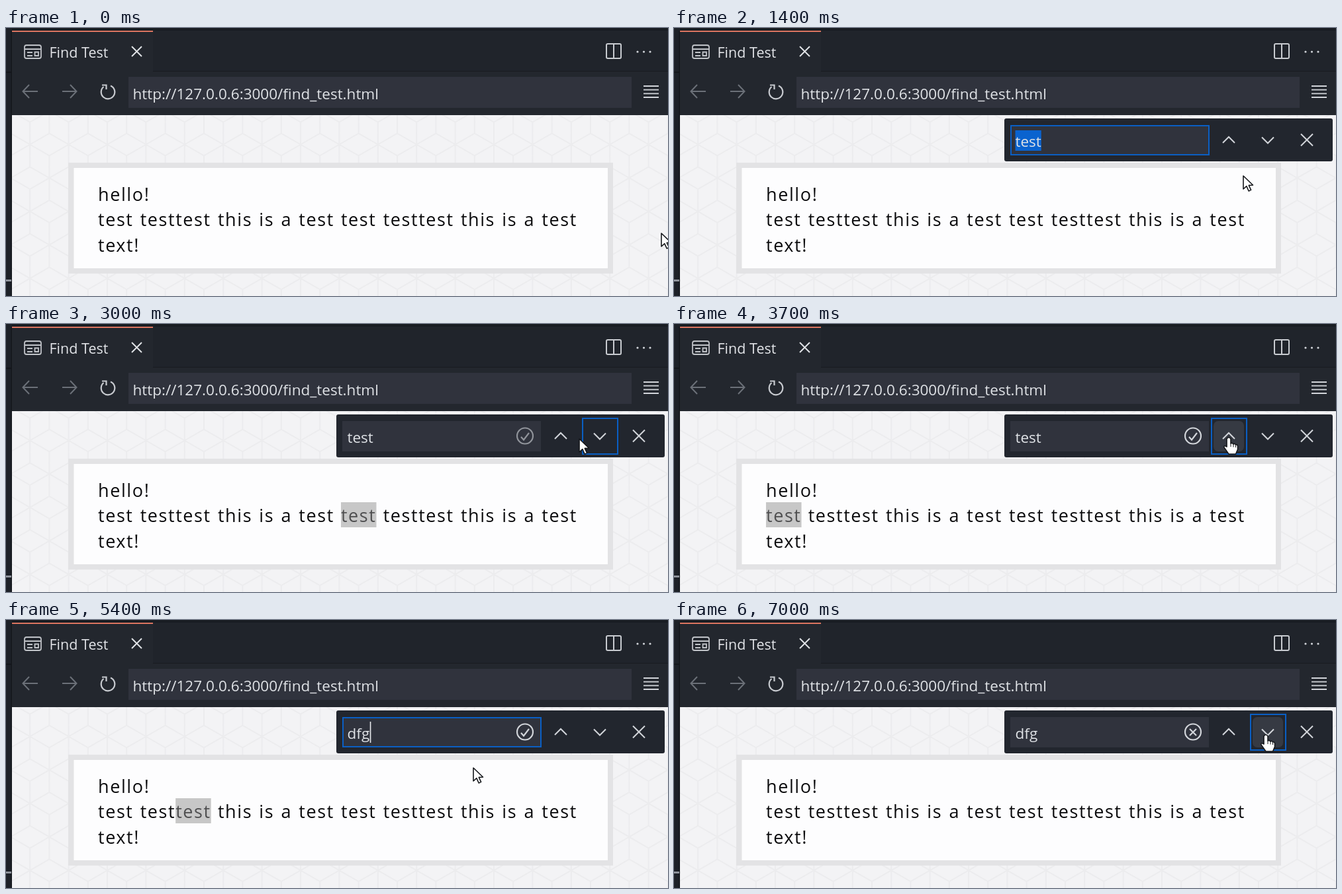
An HTML page with a canvas for the animation above (7.2 s loop, 1000 by 406 pixels).

```html
<!DOCTYPE html>
<html lang="en">
<head>
<meta charset="utf-8">
<title>Find in page</title>
<style>
  html, body { margin: 0; width: 100%; height: 100%; overflow: hidden; background: #20242b; }
  canvas { display: block; }
</style>
</head>
<body>
<canvas id="stage" width="1000" height="406"></canvas>
<script>
const ctx = document.getElementById('stage').getContext('2d');
const LOOP = 7200, STEP = 100;
const UI = '"Open Sans", "Noto Sans", sans-serif';
const ARIAL = '"Liberation Sans", Arial, sans-serif';
const LIGHT = '#d2d5da', FIELD = '#30333d', BLUE = '#0a5fc4';
const LINE = 'test testtest this is a test test testtest this is a test';
const MATCHES = [...LINE.matchAll(/test/g)].map(m => m.index);

// Timelines: [time, value], each value lasts until the next entry.
const FOCUS = [[0, ''], [500, 'menu'], [1400, 'input'], [2000, 'next'], [3200, 'prev'],
  [4200, 'next'], [4800, 'input'], [6000, ''], [6300, 'next']];
const MATCH = [[0, -1], [2000, 0], [2200, 1], [2400, 2], [2500, 3], [2700, 4],
  [3200, 3], [3300, 2], [3500, 1], [3700, 0], [4200, 1], [4400, 2], [6400, -1]];
const QUERY = [[0, 'test'], [5200, 'd'], [5300, 'df'], [5400, 'dfg']];
const RESULT = [[0, 0], [2100, 1], [2900, .6], [3100, 0], [3300, 1], [4000, .6],
  [4200, 0], [4500, 1]];
// Pointer path: [time, x, y], linear in between.
const POINTER = [[0, 990, 311], [100, 990, 298], [400, 968, 87], [800, 968, 87],
  [1100, 860, 224], [1400, 860, 224], [1800, 896, 170], [2700, 896, 170],
  [3000, 866, 174], [3200, 838, 172], [3900, 838, 172], [4200, 892, 180],
  [4500, 892, 180], [4800, 720, 172], [5200, 706, 224], [5500, 706, 224],
  [5900, 894, 174], [7200, 894, 174]];

const BUTTONS = {
  menu: [953, 75, 43, 46], prev: [815, 147, 46, 46],
  next: [874, 147, 46, 46], close: [933, 147, 46, 46]
};
const INPUT = [508, 147, 300, 46];
const MENU = ['Open in Browser', 'Find in Page', 'Open Devtools Pane'];
const ARROW = new Path2D('M0 0V20L4.8 15.6 8.2 23 11.6 21.4 8.3 14.4 14.5 14Z');
const HAND = new Path2D('M-3 2Q0-2.5 3 2V9Q5 7.500 7 10 9 8.500 10.500 11 13 10 13.500 13V18L10.500 25H0L-7 15Q-8 11-3 14Z');
const IBEAM = new Path2D('M-4-11H4M0-11V11M-4 11H4');

const at = (list, t) => list.findLast(e => e[0] <= t)[1];
const inside = ([x, y, w, h], p) => p.x >= x && p.x <= x + w && p.y >= y && p.y <= y + h;

function pointerAt(t) {
  const i = POINTER.findIndex(k => k[0] > t);
  const [t0, x0, y0] = POINTER[i - 1], [t1, x1, y1] = POINTER[i];
  const k = (t - t0) / (t1 - t0);
  return { x: x0 + (x1 - x0) * k, y: y0 + (y1 - y0) * k };
}

function rect(x, y, w, h, fill, r = 0) {
  ctx.fillStyle = fill;
  ctx.beginPath();
  ctx.roundRect(x, y, w, h, r);
  ctx.fill();
}

function outline(x, y, w, h) {
  ctx.strokeStyle = BLUE;
  ctx.lineWidth = 2;
  ctx.strokeRect(x, y, w, h);
}

function stroke(path, color = LIGHT, width = 2) {
  ctx.strokeStyle = color;
  ctx.lineWidth = width;
  ctx.stroke(new Path2D(path));
}

function text(str, x, y, size, color, family = UI) {
  ctx.font = `${size}px ${family}`;
  ctx.fillStyle = color;
  ctx.fillText(str, x, y);
}

function drawTabs() {
  rect(0, 0, 1000, 132, '#20242b');
  rect(0, 0, 1000, 4, '#191d23');
  rect(9, 4, 213, 62, '#23272e');
  rect(9, 4, 213, 2, '#dc7560');
  rect(222, 65, 778, 1.5, '#181b21');
  rect(9, 66, 991, 66, '#23272e');
  text('Find Test', 65.5, 45, 21.5, '#e2e4e8');
  stroke('M31 26H50Q53 26 53 29V43Q53 46 50 46H31Q28 46 28 43V29Q28 26 31 26ZM28 32H53M32 37H40M32 42H40M43.500 36.500H49V42H43.500Z', '#c0c3c8', 1.8);
  stroke('M190 28L205 43M205 28L190 43', '#dfe1e5');
  stroke('M909 24H927Q929 24 929 26V44Q929 46 927 46H909Q907 46 907 44V26Q907 24 909 24ZM918 24V46', '#c8cbd0');
  for (const x of [954, 963.5, 973]) rect(x - 1.6, 34.4, 3.2, 3.2, LIGHT, 1.6);
}

function drawAddressBar(hover, focus) {
  rect(185, 74, 760, 47, FIELD);
  text('http://127.0.0.6:3000/find_test.html', 191.5, 107.500, 22.5, '#dfe2e6');
  stroke('M48 96H26M35 86L25.500 96 35 106M85 96H106M97 86L106.500 96 97 106', '#6b7078');
  stroke('M158 87.500A10.300 10.300 0 1 1 147.500 89M145 86.500H151.500V93', '#c8cbd0', 2.2);
  if (hover === 'menu') rect(...BUTTONS.menu, '#363a43', 7);
  if (focus === 'menu') outline(948.500, 70.500, 51, 55);
  stroke('M963 88H986M963 93.700H986M963 99.400H986M963 105H986', LIGHT, 1.8);
}

function drawPage(match) {
  rect(9, 132, 991, 274, '#f3f3f5');
  const w = 29.2, h = 16.9;
  let cubes = '';
  for (let row = 0; row < 8; row++) {
    const y = 92 + row * 3 * h;
    for (let x = 7 + (row % 2) * w; x < 1040; x += 2 * w)
      cubes += `M${x - w} ${y + h}V${y - h}L${x} ${y - 2 * h} ${x + w} ${y - h} ${x} ${y} ${x - w} ${y - h}M${x} ${y}V${y + 2 * h}`;
  }
  ctx.save();
  ctx.beginPath();
  ctx.rect(9, 132, 991, 274);
  ctx.clip();
  stroke(cubes, '#ececee', 2);
  ctx.restore();

  rect(94, 204, 823, 168, '#e3e3e5');
  rect(102.500, 212, 806.5, 152, '#fdfdfe');
  ctx.letterSpacing = '1.6px';
  ctx.wordSpacing = '1.6px';
  ['hello!', LINE, 'text!'].forEach((s, i) => text(s, 139, 262 + i * 38.4, 27, '#0c0c0e'));
  if (match >= 0) {
    const x = 139 + ctx.measureText(LINE.slice(0, MATCHES[match])).width;
    rect(x, 270, ctx.measureText('test').width, 38, 'rgba(145,145,145,.5)');
  }
  ctx.letterSpacing = ctx.wordSpacing = '0px';
}

function drawLeftEdge() {
  rect(0, 0, 9, 406, '#1d2128');
  rect(0, 66, 9, 2, '#14171c');
  rect(7.500, 4, 1.5, 402, '#14171c');
  rect(0, 381, 8, 3, '#8f949c');
}

function drawMenu(p) {
  ctx.shadowColor = 'rgba(0,0,0,.35)';
  ctx.shadowBlur = 6;
  rect(728, 132, 272, 181, FIELD);
  ctx.shadowBlur = 0;
  MENU.forEach((label, i) => {
    const row = [728, 144 + i * 52.5, 272, 52.5];
    if (inside(row, p)) rect(...row, '#3c404a');
    text(label, 755, 178 + i * 52.5, 24, '#dfe2e6', ARIAL);
  });
}

function drawFind(t, hover, focus) {
  rect(499, 137, 496, 65, '#22262e', 3);
  rect(...INPUT, FIELD);
  const query = at(QUERY, t);
  ctx.font = `22.5px ${UI}`;
  const width = ctx.measureText(query).width;
  const selected = focus === 'input' && query === 'test';
  if (selected) rect(515.5, 155, width, 31, '#0a63cf');
  text(query, 515.5, 179.5, 22.5, '#dfe2e6');
  if (focus === 'input') {
    outline(509, 148, 299, 44);
    if (!selected) rect(516 + width, 154, 1.6, 32, '#e8eaed');
  }

  ctx.globalAlpha = at(RESULT, t);
  const mark = t >= 6400 ? 'M779 165L789 175M789 165L779 175' : 'M778 171L782 175.500 790 165';
  stroke('M796 169.500A12 12 0 1 1 772 169.500A12 12 0 1 1 796 169.500' + mark, LIGHT, 2.2);
  ctx.globalAlpha = 1;

  if (BUTTONS[hover]) rect(...BUTTONS[hover], '#363a43', 7);
  if (focus === 'prev' || focus === 'next') {
    const [x, y, w, h] = BUTTONS[focus];
    outline(x - 3, y - 4, w + 7, h + 8);
  }
  stroke('M829 174L838 165 847 174M888 165.500L897 174.500 906 165.500M947 160.500L965 178.500M965 160.500L947 178.500');
}

function drawPointer(p, shape) {
  ctx.save();
  ctx.translate(p.x, p.y);
  ctx.lineJoin = 'round';
  ctx.lineWidth = 1.6;
  ctx.strokeStyle = shape === IBEAM ? '#e8e8e8' : '#15171b';
  ctx.fillStyle = '#fff';
  if (shape !== IBEAM) ctx.fill(shape);
  ctx.stroke(shape);
  if (shape === HAND) {
    ctx.lineWidth = 1;
    ctx.stroke(new Path2D('M3 9V14M7 10V14.500M10.500 11V15'));
  }
  ctx.restore();
}

function draw(t) {
  const p = pointerAt(t), focus = at(FOCUS, t);
  const menuOpen = t >= 500 && t < 1400, findOpen = t >= 1400;
  const hover = Object.keys(BUTTONS).find(k => (k === 'menu' || findOpen) && inside(BUTTONS[k], p));
  drawTabs();
  drawAddressBar(hover, focus);
  drawPage(at(MATCH, t));
  drawLeftEdge();
  if (menuOpen) drawMenu(p);
  if (findOpen) drawFind(t, hover, focus);
  const overMenu = menuOpen && inside([728, 144, 272, 158], p);
  const overInput = findOpen && inside(INPUT, p);
  drawPointer(p, hover || overMenu ? HAND : overInput ? IBEAM : ARROW);
}

const start = performance.now();
function tick() {
  const t = (performance.now() - start) % LOOP;
  draw(Math.floor(t / STEP) * STEP);
  requestAnimationFrame(tick);
}
tick();
</script>
</body>
</html>
```
